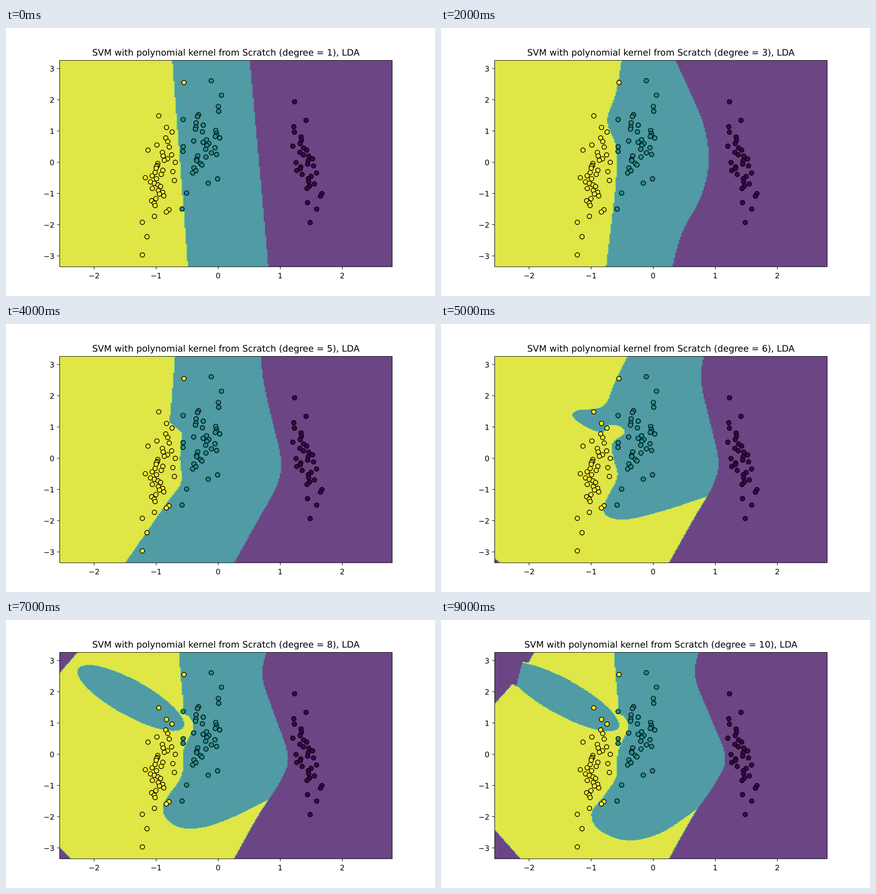
Animation, 947 px wide and 592 px high, one loop 10 s. Source, as an HTML page with a canvas:

```html
<!DOCTYPE html>
<html lang="en">
<head>
<meta charset="utf-8">
<title>Decision regions</title>
<style>
  html, body { margin: 0; width: 100%; height: 100%; overflow: hidden; background: #fff; }
  canvas { position: absolute; left: 119px; top: 72px; }
  svg { position: absolute; left: 0; top: 0; }
  text { font: 16.44px "DejaVu Sans", sans-serif; text-rendering: geometricPrecision; }
  #title { font-size: 19.73px; text-anchor: middle; }
  .x { text-anchor: middle; }
  .y { text-anchor: end; }
  .axes { fill: none; stroke: #000; stroke-width: 1.1; }
  circle { stroke: #000; stroke-width: 1.64; }
</style>
</head>
<body>
<canvas id="field" width="734" height="456"></canvas>
<svg id="chart" width="947" height="592" viewBox="0 0 947 592">
  <text id="title" x="485.4" y="61"></text>
</svg>
<script>
const PURPLE = 0, TEAL = 1, YELLOW = 2;
const LEFT = 118.4, TOP = 71, CELL_X = 2.738, CELL_Y = 1.38;
const COLS = 270, ROWS = 332, WIDTH = 734, HEIGHT = 456;
const BANDS = ['6c4585', '67699f', '5c81a4', '509ba4', '4bb1a1', '62c991', 'a1dd6d', 'dfe646']
  .map(hex => [0, 2, 4].map(i => parseInt(hex.slice(i, i + 2), 16)));

const chart = document.getElementById('chart');
const title = document.getElementById('title');
const field = document.getElementById('field').getContext('2d');

// Smooth closed outline through "x,y x,y ..."; a slash makes a corner.
function outline(curve) {
  const path = new Path2D();
  curve.split(' / ').forEach((run, part) => {
    const p = run.split(' ').map(pair => pair.split(',').map(Number));
    if (part) path.lineTo(...p[0]); else path.moveTo(...p[0]);
    for (let i = 0; i + 1 < p.length; i++) {
      const a = p[i], b = p[i + 1], before = p[i - 1] || a, after = p[i + 2] || b;
      path.bezierCurveTo(a[0] + (b[0] - before[0]) / 6, a[1] + (b[1] - before[1]) / 6,
                         b[0] - (after[0] - a[0]) / 6, b[1] - (after[1] - a[1]) / 6, ...b);
    }
  });
  path.closePath();
  return path;
}

const patch = (label, curve) => [label, outline(curve)];
const left = curve => patch(YELLOW, curve + ' / 100,540 / 100,60');
const wedge = curve => left(curve + ' / 640,365 / 640,540');
const right = curve => patch(PURPLE, curve + ' / 870,540 / 870,60');

// Right border of the higher degrees: dips in near the top, bulges out at mid height.
const bulge = (top, dip, peak) => right(
  `${top},60 ${dip},125 ${(dip + peak) / 2},213 ${peak},300 ${600 + (peak - 612) / 2},357 557,432 497,540`);

// Tilted teal ellipse that grows up and left from a fixed right end.
function lobe(reach) {
  const path = new Path2D();
  path.ellipse(392 - 0.876 * reach, 210 - 0.285 * reach, reach, 39.3, 0.505, 0, 2 * Math.PI);
  return [TEAL, path];
}

const nub = '381,60 384,105 390,170 394,206 404,214 413,238 391,290 387,345';

// Regions per degree, painted in order over teal.
const models = [
  [left('366,60 403,540'), right('537,60 581,540')],
  [left('371,60 385,260 350,540'), right('497,60 577,300 497,540')],
  [left('400,60 387,140 367,205 386,262 386,340 363,540'),
   right('512,60 546,133 580,215 591,295 574,372 531,455 508,540')],
  [left('394,60 380,145 360,205 387,255 386,340 350,540'), bulge(543, 556, 600),
   patch(PURPLE, '100,503 / 138,540 / 100,540')],
  [left('374,60 367,150 361,217 / 388,240 384,300 386,350 350,402 255,540'), bulge(562, 568, 607)],
  [wedge('417,60 383,130 358,181 300,191 292,206 325,230 358,239 369,224 394,226 404,241 378,264 ' +
         '381,300 389,338 361,397 366,424 410,432 490,413 590,380'),
   bulge(582, 574, 612), patch(PURPLE, '100,501 / 144,540 / 100,540')],
  [left('422,60 408,133 391,183 383,187 / 370,196 / 384,228 394,216 410,236 389,276 386,345 345,405 268,540'),
   lobe(123), bulge(580, 569, 618)],
  [wedge(nub + ' 346,412 372,454 430,459 500,436 580,397'), lobe(133), bulge(578, 566, 622),
   patch(PURPLE, '100,484 / 156,540 / 100,540'), patch(PURPLE, '100,138 / 168,60 / 100,60')],
  [left(nub + ' 360,387 320,440 316,485 372,540'), lobe(141), bulge(575, 563, 625)],
  [wedge(nub + ' 360,388 332,428 352,466 415,487 490,468 575,410'), lobe(141), bulge(572, 561, 627),
   patch(PURPLE, '100,206 / 158,141 / 166,147 / 180,92 / 193,94 / 212,60 / 100,60'),
   patch(PURPLE, '100,443 / 187,540 / 100,540')]
];

const mask = Object.assign(document.createElement('canvas'), { width: COLS, height: ROWS })
  .getContext('2d', { willReadFrequently: true });

function classify(regions) {
  const grid = new Uint8Array(COLS * ROWS).fill(TEAL);
  for (const [label, path] of regions) {
    mask.setTransform(1, 0, 0, 1, 0, 0);
    mask.clearRect(0, 0, COLS, ROWS);
    mask.setTransform(1 / CELL_X, 0, 0, 1 / CELL_Y, 0.5 - LEFT / CELL_X, 0.5 - TOP / CELL_Y);
    mask.fill(path);
    const { data } = mask.getImageData(0, 0, COLS, ROWS);
    for (let i = 0; i < grid.length; i++) if (data[i * 4 + 3] > 127) grid[i] = label;
  }
  return grid;
}

// Filled contours: interpolate the class grid and cut it into colour bands.
function renderField(regions) {
  const grid = classify(regions);
  const image = field.createImageData(WIDTH, HEIGHT);
  const mix = (a, b, t) => a + (b - a) * t;
  for (let y = 0, out = 0; y < HEIGHT; y++) {
    const v = (y + 72.5 - TOP) / CELL_Y, row = Math.floor(v);
    for (let x = 0; x < WIDTH; x++, out += 4) {
      const u = (x + 119.5 - LEFT) / CELL_X, col = Math.floor(u), i = row * COLS + col;
      const value = mix(mix(grid[i], grid[i + 1], u - col),
                        mix(grid[i + COLS], grid[i + COLS + 1], u - col), v - row);
      const [r, g, b] = BANDS[Math.max(0, Math.ceil(value * 4) - 1)];
      image.data[out] = r;
      image.data[out + 1] = g;
      image.data[out + 2] = b;
      image.data[out + 3] = 255;
    }
  }
  return image;
}

function add(tag, attrs, content = '') {
  const el = document.createElementNS('http://www.w3.org/2000/svg', tag);
  for (const key in attrs) el.setAttribute(key, attrs[key]);
  el.textContent = content;
  chart.append(el);
}

let seed = 7;
function random() {
  seed = (seed * 16807) % 2147483647;
  return seed / 2147483647;
}
const bell = u => 0.57 * Math.log(u / (1 - u));

// Bell-shaped cloud, spread evenly over its height, leaning by slope.
function cluster(fill, count, x, y, spreadX, spreadY, slope) {
  for (let i = 0; i < count; i++) {
    const dy = spreadY * bell((i + 0.2 + 0.6 * random()) / count);
    const dx = slope * dy + spreadX * bell(0.05 + 0.9 * random());
    add('circle', { cx: x + dx, cy: y + dy, r: 4.93, fill });
  }
}
cluster('#fde725', 46, 342, 325, 27, 66, -0.1);
cluster('#21918c', 41, 431, 256, 28, 55, -0.12);
cluster('#440154', 34, 663, 302, 15, 58, 0.2);

const label = n => String(n).replace('-', '\u2212');
let axes = 'M118.5 71.5H852.5V527.5H118.5Z';
for (let n = -2; n <= 2; n++) {
  const x = 468.5 + n * 137;
  axes += `M${x} 527.5v5.8`;
  add('text', { class: 'x', x: x - 0.2, y: 552.5 }, label(n));
}
for (let n = -3; n <= 3; n++) {
  const y = 296.5 - n * 69;
  axes += `M118.5 ${y}h-5.8`;
  add('text', { class: 'y', x: 106.9, y: y + 6 }, label(n));
}
add('path', { class: 'axes', d: axes });

const images = models.map(renderField);
let shown = -1;

function tick() {
  const step = Math.floor(performance.now() / 1000) % images.length;
  if (step !== shown) {
    shown = step;
    field.putImageData(images[step], 0, 0);
    title.textContent = `SVM with polynomial kernel from Scratch (degree = ${step + 1}), LDA`;
  }
  requestAnimationFrame(tick);
}
tick();
</script>
</body>
</html>
```
